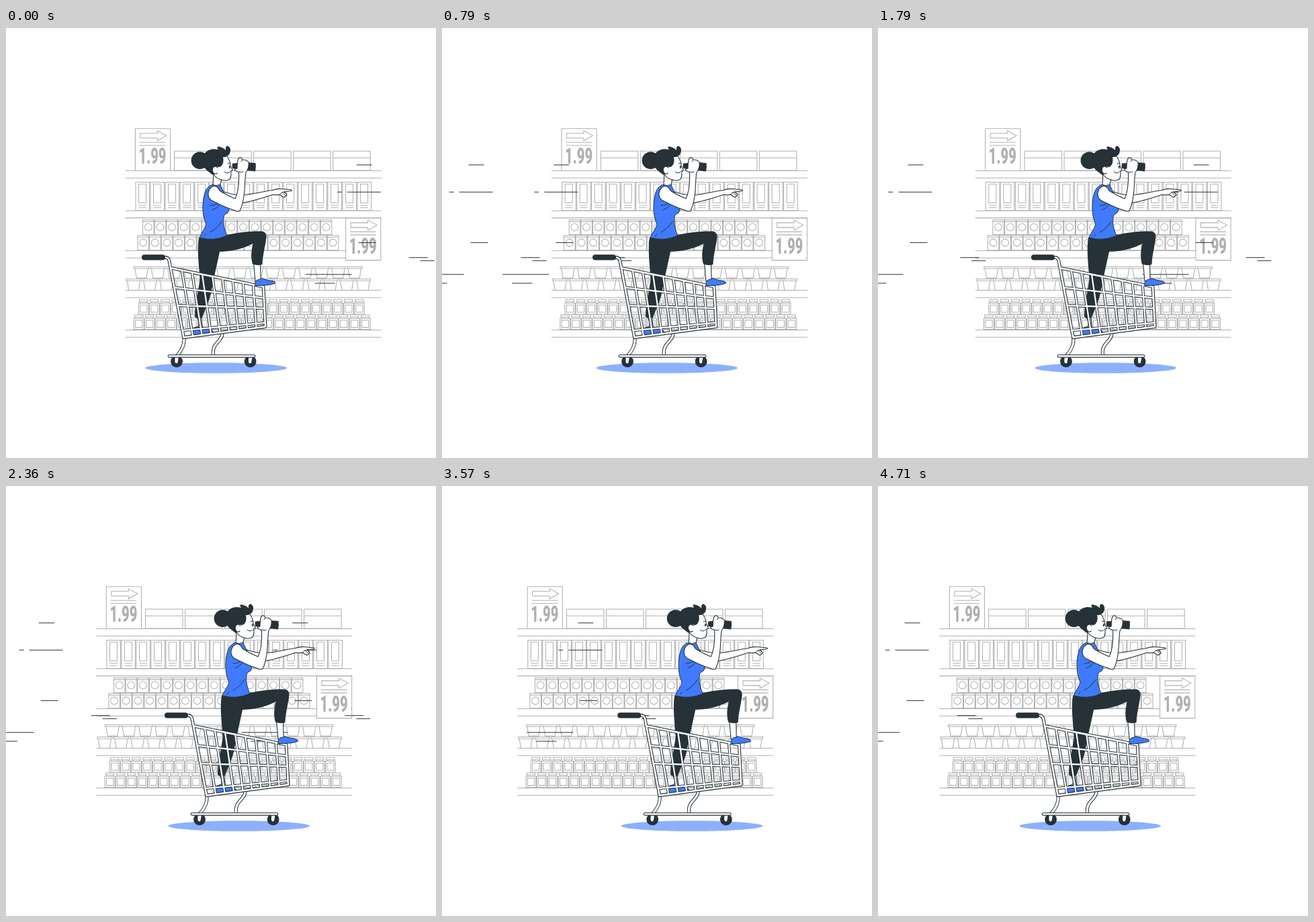
These frames come from a looping animation (640 by 640 pixels, 4.78 s). An HTML page:

```html
<!DOCTYPE html>
<html lang="en">
<head>
<meta charset="utf-8">
<title>Shopping lookout</title>
<style>
html, body { margin: 0; width: 100%; height: 100%; overflow: hidden; background: #fff; }
svg { display: block; width: 100vw; height: 100vh; }
.shelf { fill: #fff; stroke: #b0b0b0; stroke-width: 1.05; }
.price { font: 900 34px Roboto, "Open Sans", sans-serif; fill: #b0b0b0; stroke: none; text-anchor: middle; }
.speed { fill: none; stroke: #263238; stroke-width: 1; }
.ink { fill: #263238; }
.blue { fill: #407bff; stroke: #263238; stroke-width: 1; stroke-linejoin: round; }
.skin { fill: #fff; stroke: #263238; stroke-width: 1.1; stroke-linejoin: round; stroke-linecap: round; }
.fold { fill: none; stroke: #263238; stroke-width: 1; stroke-linecap: round; }
.dark, .light { fill: none; stroke-linecap: round; stroke-linejoin: round; }
.dark { stroke: #263238; }
.light { stroke: #fff; }
</style>
</head>
<body>
<svg viewBox="0 0 640 640" xmlns="http://www.w3.org/2000/svg">
  <g id="shelf" class="shelf"></g>
  <g class="speed"><path id="rushA"/><path id="rushB"/></g>
  <g id="rider">
    <ellipse cx="312.7" cy="506" rx="105.3" ry="7.8" fill="#8cb0ff"/>

    <!-- standing leg -->
    <path class="skin" d="M283 428L287 437Q288 441 285 448L294 449Q291 441 291 430Z"/>
    <path class="blue" d="M276 456Q276 446 285 444.500Q290 449 297 447.500Q307 448 310 454Q300 457 276 457Z"/>
    <path class="ink" d="M287 312C284 328 287 351 288.500 373C287 390 281 408 281 430Q286 434 292 431C298 414 304 404 306 390C309 372 314 352 318 333L329 309Z"/>

    <!-- raised leg -->
    <path class="skin" d="M368.500 349L371 377L379 374L378.500 349Z"/>
    <path class="ink" d="M288 312Q306 318 328 308C343 305 360 302 381 302.5Q388 304 387.5 311C386 325 382 337 381.5 352Q374 354 367 351.5C364 341 365 332 367.5 321C352 329 335 333 315 333L296 333Z"/>

    <!-- pointing arm -->
    <path class="skin" d="M322 243Q338 249 353 248.500C370 247 383 243 396 241.500Q403 239 410 239.500L424 240.800Q427 242 424 242.500L414 244L418 248Q418 250 416 249.800Q416 252 413 251.500L407 248Q402 249 397 248C382 253 367 258 349 261L322 257Z"/>
    <path class="fold" d="M407 248L411 244.500L416 249.500M411 244.500L416 243.800"/>

    <!-- neck and torso -->
    <path class="skin" d="M309 216L308 234Q313 241 318 236L321 225L319 214Z"/>
    <path class="blue" d="M307 233Q313 236 319 233C321 240 330 252 330 261Q334 269 330 275L325 278C322 287 324 298 329 309Q309 318 288 312C291 304 296 300 298 292C293 282 291 265 295 249Q297 237 307 233Z"/>
    <path class="fold" d="M304 264Q308 265 315 261M307 271Q313 269 318 263M321 288Q314 299 304 304M298 307L295 310"/>

    <!-- head -->
    <path class="skin" d="M309 203C313 192 323 188 329 191Q334 198 334 205L337 211Q337 213 334.500 213Q336 220 333 225Q327 229 318 225Q310 222 309 216Z"/>
    <circle class="ink" cx="288.500" cy="197.200" r="12.900"/>
    <path class="ink" d="M294 189C299 181 307 179 316 181Q312 176 317 176.500Q324 178 327 182Q326 176 330 175.500Q336 178 333 187Q329 193 323 192Q325 201 320 206Q316 208 314 206C311 209 312 216 308 219C302 214 295 211 293 202Z"/>
    <path class="skin" d="M315 208Q311 204 308 208Q306 212 309 216Q312 218 314 216"/>
    <ellipse class="ink" cx="332.800" cy="207" rx="1" ry="2.300"/>
    <path class="fold" d="M330 202Q332 200 334 202M325 214Q329 218 333 214"/>

    <!-- binoculars and near arm -->
    <path class="ink" d="M337 201.500L344 201L360 202V200L371.500 201Q372.500 207 371 213.500L359 212L344 210L337 209Q336 205 337 201.500Z"/>
    <path class="skin" d="M303 240C309 232 315 235 318 242C325 247 334 251 341 254C346 244 347 230 346.500 215L341 212Q339 210 344 209Q344 201 345 197Q346 192 350 193L352 196Q359 196 361 200Q362 208 357 215C355 225 356 239 354 250Q352 264 348 272Q344 274 339 271C326 267 315 261 305 256Q298 249 303 240Z"/>
    <path class="fold" d="M352 196L350 199M347 214Q350 216 353 214"/>

    <g id="cart"></g>
    <path class="blue" d="M371 383.500Q370 377 374 375Q379 374 381 372.500Q389 376 397 376.500Q401 378 400.500 380Q389 384 371 383.500Z"/>
  </g>
</svg>
<script>
const LOOP = 4780;
const $ = id => document.getElementById(id);
const times = (n, f) => Array.from({ length: n }, (_, i) => f(i)).join('');
const path = (d, extra = '') => `<path d="${d}" ${extra}/>`;
const box = (x, y, w, h) => `M${x} ${y}h${w}v${h}h${-w}z`;

// Shelf goods
const row = (n, x, step, item) => path(times(n, i => item(x + i * step)));
const crate = x => box(x, 183.3, 55.5, 28.8) + `M${x} 193.3h55.5`;
const pack = x => box(x, 229.5, 20.6, 42) + box(x + 4.6, 232.2, 11, 28) +
  `M${x + 4.5} 264h11.5M${x + 4.5} 267.500h11.5`;
const tin = y => x => box(x, y, 16.6, 22) + `M${x} ${y + 2.600}h16.6` +
  `M${x + 2.7} ${y + 10.9}a5.5 5.5 0 1 0 11 0a5.500 5.500 0 1 0 -11 0`;
const pot = y => x => box(x, y, 22.3, 2.8) + `M${x + 1.5} ${y + 2.8}l2.300 14h14.7l2.300 -14`;
const jar = y => x => box(x + 1.2, y, 12.6, 3.2) + box(x + 2.5, y + 3.2, 10, 2) +
  box(x, y + 5.2, 15, 16.4) + box(x + 2.3, y + 8, 10.4, 10.6);

const sign = (x, y) => `<g transform="translate(${x} ${y})">` +
  path(box(0, 0, 52.2, 62.7)) +
  path('M7.500 7H33V3L46.500 10.5L33 18V14H7.500Z') +
  path('M6.300 20.500H45M6.300 25H45') +
  `<text class="price" transform="translate(25.600 52.600) scale(.59 1)">1.99</text></g>`;

$('shelf').innerHTML =
  path([212.4, 223.3, 271.9, 282.6, 331.400, 342.3, 390.2, 401.2, 449.5, 460.3]
    .map(y => `M177.500 ${y}H558.5`).join('')) +
  row(5, 250.7, 59, crate) + row(16, 193, 22, pack) +
  row(16, 203.6, 17.65, tin(285.5)) + row(17, 196, 17.65, tin(308.7)) +
  row(14, 190.5, 24.400, pot(355.3)) + row(15, 178.9, 24.400, pot(373.4)) +
  row(21, 197.4, 16.05, jar(404.3)) + row(22, 190.2, 16.05, jar(427)) +
  sign(192.400, 149.8) + sign(505.6, 282.9);

// Cart: tubes are a dark line with a narrower white one on top
const CELLS = 9;
const mix = (a, b, k) => a + (b - a) * k;
const at = (u, v) => {
  const topY = mix(357.5, 385, u), lowY = mix(460.5, 444.5, u);
  return `${mix(mix(246.5, 383, u), mix(264.5, 386, u), v).toFixed(1)} ${mix(topY, lowY, v).toFixed(1)}`;
};
const bar = (u1, v1, u2, v2) => `M${at(u1, v1)}L${at(u2, v2)}`;
const grid = times(CELLS - 1, i => bar((i + 1) / CELLS, 0, (i + 1) / CELLS, 1)) +
  [.28, .54, .9].map(v => bar(0, v, 1, v)).join('');
const frame = 'M236 341.500H238Q242 342 243 347L264.500 460.500L386 444.500L383 385L246.500 357.500';
const legs = 'M265 461Q266 475 255 487M322 455C321 468 306 468 308.500 487';
const base = 'M243 488.300H369';
const tube = (d, w, inner) => [['dark', w], ['light', inner]]
  .map(([c, s]) => path(d, `class="${c}" stroke-width="${s}"`));
const [legDark, legLight] = tube(legs, 5.2, 3.2);
const [gridDark, gridLight] = tube(grid, 4.2, 2.2);
const [frameDark, frameLight] = tube(frame, 4.8, 2.6);
const [baseDark, baseLight] = tube(base, 4.8, 2.6);
const wheel = x => `<circle class="ink" cx="${x}" cy="496.200" r="8.900"/>` +
  path(`M${x - 2.5} 489L${x - 2.7} 497Q${x - 1} 501 ${x + 1.5} 498L${x + 3} 489Z`, 'fill="#fff"');
$('cart').innerHTML = legDark + legLight + gridDark + frameDark + gridLight + frameLight +
  wheel(254) + wheel(363.6) + baseDark + baseLight +
  '<rect class="ink" x="202" y="337.200" width="35" height="8.300" rx="4.100"/>';

// Speed lines: x, y, length
const rush = [[522, 203.8, 23], [493, 244.2, 7], [508, 244.2, 50], [525, 319.400, 26],
  [600, 341.7, 28], [617, 346.300, 21], [446, 366.8, 69], [460, 379.9, 30]]
  .map(([x, y, w]) => `M${x} ${y}h${w}`).join('');
$('rushA').setAttribute('d', rush);
$('rushB').setAttribute('d', rush);
const passes = [[0, 1097, 2236, 3262], [438, 1704, 2718, 3928]];
const SWEEP = 800, LINGER = 52, REACH = 482.5;

// cubic-bezier(.25, .1, .25, 1)
function ease(x) {
  let lo = 0, hi = 1;
  for (let i = 0; i < 24; i++) {
    const u = (lo + hi) / 2;
    if (.75 * u - .75 * u * u + u ** 3 < x) lo = u; else hi = u;
  }
  return .3 * lo + 2.4 * lo * lo - 1.7 * lo ** 3;
}

// Cart drift: smooth monotone curve through a few points
const drift = [[0, 0], [790, 22], [1790, 26], [2860, 44], [3570, 59.2], [4070, 46.2], [4710, 3.2], [LOOP, 0]];
const slope = i => (drift[i + 1][1] - drift[i][1]) / (drift[i + 1][0] - drift[i][0]);
const tangent = i => {
  if (i === 0) return slope(0);
  if (i === drift.length - 1) return slope(i - 1);
  const a = slope(i - 1), b = slope(i);
  return a * b <= 0 ? 0 : 2 * a * b / (a + b);
};
function cartX(t) {
  let i = 0;
  while (i < drift.length - 2 && t >= drift[i + 1][0]) i++;
  const [t0, x0] = drift[i], [t1, x1] = drift[i + 1];
  const h = t1 - t0, k = (t - t0) / h, k2 = k * k, k3 = k2 * k;
  return x0 * (2 * k3 - 3 * k2 + 1) + x1 * (3 * k2 - 2 * k3) +
    h * (tangent(i) * (k3 - 2 * k2 + k) + tangent(i + 1) * (k3 - k2));
}

const shift = (id, x) => $(id).setAttribute('transform', `translate(${x.toFixed(2)} 0)`);

function sweep(id, starts, t) {
  const start = starts.filter(s => s <= t).pop();
  const on = start !== undefined && t - start < SWEEP + LINGER;
  $(id).setAttribute('visibility', on ? 'visible' : 'hidden');
  if (on) shift(id, -REACH * ease(Math.min(1, (t - start) / SWEEP)));
}

function draw(t) {
  shift('shelf', -.01826 * t);
  shift('rider', cartX(t));
  sweep('rushA', passes[0], t);
  sweep('rushB', passes[1], t);
}

const begin = performance.now();
function tick() {
  draw((performance.now() - begin) % LOOP);
  requestAnimationFrame(tick);
}
draw(0);
requestAnimationFrame(tick);
</script>
</body>
</html>
```
